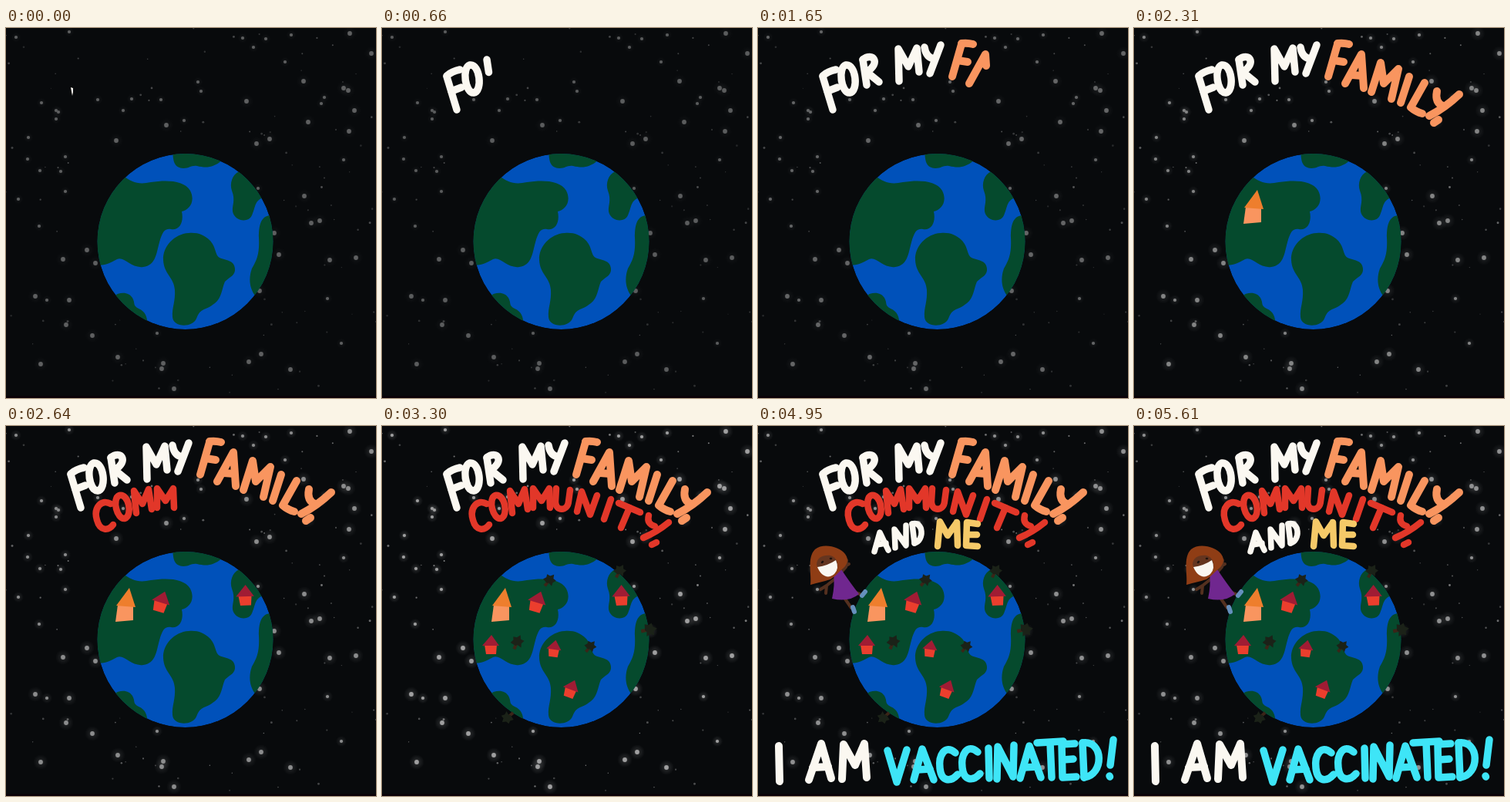
Animation, 480 px wide and 480 px high, one loop 6.27 s. Source, as an HTML page:

```html
<!DOCTYPE html>
<html lang="en">
<head>
<meta charset="utf-8">
<title>For my family, community, and me</title>
<style>
@property --s { syntax: "<number>"; inherits: true; initial-value: 0; }
html, body { margin: 0; width: 100%; height: 100%; overflow: hidden; background: #080a0c; }
svg { display: block; width: 100vw; height: 100vh; animation: tick 6.27s steps(19) infinite; }

/* --s counts the 330 ms steps of the loop */
@keyframes tick { to { --s: 19; } }
@keyframes twinkle {
  0% { opacity: .42; animation-timing-function: steps(4); }
  21.053% { opacity: .38; animation-timing-function: steps(3); }
  36.842% { opacity: .6; animation-timing-function: steps(3); }
  52.632% { opacity: .74; animation-timing-function: steps(3); }
  68.421% { opacity: .64; animation-timing-function: steps(2); }
  78.947%, 100% { opacity: .66; }
}
.twinkle { animation: twinkle 6.27s infinite; }
.pop { opacity: clamp(0, var(--s) - var(--k) + 1, 1); }
.first { opacity: clamp(0, 1 - var(--s), 1); }
.word path {
  fill: none;
  stroke-linecap: round;
  stroke-linejoin: round;
  stroke-dasharray: 1 3;
  stroke-dashoffset: clamp(0px, (var(--end) - var(--s)) * var(--rate) * 1px, 1.1px);
}
</style>
</head>
<body>
<svg viewBox="0 0 480 480" role="img" aria-label="For my family, community, and me, I am vaccinated!">
  <defs>
    <radialGradient id="glow">
      <stop offset="0" stop-color="#fff" stop-opacity=".5"/>
      <stop offset=".4" stop-color="#fff" stop-opacity=".17"/>
      <stop offset="1" stop-color="#fff" stop-opacity="0"/>
    </radialGradient>
    <clipPath id="globe"><circle cx="232.500" cy="277" r="114"/></clipPath>
    <g id="tree">
      <path d="M-2 3H2L2.500 12H-2Z" fill="#3b2518"/>
      <path d="M-8 6L-6 1L-8-3L-3-4L0-9L3-4L8-4L6 1L8 6L2 5L0 7Z" fill="#1b2218"/>
    </g>
  </defs>

  <rect width="480" height="480" fill="#080a0c"/>
  <g id="stars" class="twinkle"><g id="glows" class="twinkle"></g></g>
  <rect y="477.500" width="480" height="2.500" fill="#0a0006"/>

  <g clip-path="url(#globe)">
    <circle cx="232.500" cy="277" r="114" fill="#0051ba"/>
    <g fill="#054a2d">
      <path d="M150 190C164 202 174 203 188 200C207 197 231 197 239 211C246 225 238 236 228 238C231 252 225 263 214 261C206 260 203 264 199 278C195 293 194 308 178 310C162 312 154 296 144 300C136 304 131 308 118 308L100 250Z"/>
      <path d="M237 266C218 267 203 284 204 301C205 320 218 323 219 340C220 355 215 363 216 375C217 389 242 389 247 377C253 362 257 368 271 357C280 350 280 338 284 329C290 323 298 321 297 312C296 301 286 302 277 298C271 295 273 285 265 276C257 268 248 265 237 266Z"/>
      <path d="M216 158C217 172 217 181 230 182C239 182 239 178 248 179C260 182 269 181 280 172V155Z"/>
      <path d="M303 186C293 190 290 202 293 211C298 224 293 230 294 238C296 250 314 254 319 243C324 232 322 225 333 220L325 180Z"/>
      <path d="M343 243C330 244 328 257 328 272C329 292 326 300 319 312C315 323 315 336 323 347L355 320V243Z"/>
      <path d="M139 348C149 341 160 343 164 350C168 357 164 360 172 364C181 368 183 374 184 386L150 390Z"/>
    </g>
  </g>

  <g class="pop" style="--k:7">
    <path d="M145 232L165 233L165 252L142 254Z" fill="#f9955f"/>
    <path d="M160 210L143 233L168 235Z" fill="#ee7e2d"/>
  </g>
  <g id="town"></g>

  <g class="pop" style="--k:13" fill="none" stroke-linecap="round" stroke-linejoin="round">
    <path d="M110 220L121 236M121 214L132 218M99 199L89 207L81 212M106 192L114 183L115 174M89 207L88 217M113 182L118 179" stroke="#54301f" stroke-width="4"/>
    <path d="M123 235L125 241M135 220L139 215" stroke="#6590bd" stroke-width="6"/>
    <path d="M98 192L108 186Q120 204 131 218Q118 229 96 224Q100 206 98 192Z" fill="#70278f"/>
    <path d="M68 206C70 193 63 171 74 160C85 151 106 157 113 166C119 174 115 181 109 186C104 190 99 196 94 199C84 202 79 203 68 206Z" fill="#8f3d15"/>
    <path d="M76 180C76 171 84 167 94 168C103 170 105 181 102 187C96 198 82 196 76 180Z" fill="#65351f"/>
    <path d="M77 183Q91 181 101 174Q106 185 99 192C91 199 82 195 77 183Z" fill="#faf7f1"/>
    <path d="M83 177L84 176M94 172L95 172" stroke="#20130e" stroke-width="2.500"/>
  </g>

  <g id="words"></g>
  <path class="first" d="M84 77L87 78L87 83L86 88Z" fill="#fbf8f1"/>
</svg>

<script>
const $ = id => document.getElementById(id);

function add(parent, tag, attrs) {
  const el = document.createElementNS("http://www.w3.org/2000/svg", tag);
  for (const key in attrs) el.setAttribute(key, attrs[key]);
  return parent.appendChild(el);
}

// Sky: placed bright stars, then a seeded dust of faint ones
const bright = [
  218,468, 204,435, 202,442, 45,436, 145,427, 315,433, 331,423, 369,443, 112,399, 78,385,
  82,353, 38,348, 74,300, 105,288, 116,305, 143,146, 208,126, 312,95, 325,150, 342,144,
  386,69, 392,122, 445,134, 474,33, 446,7, 444,81, 438,78, 452,107, 387,218, 396,253,
  407,250, 420,301, 454,298, 354,294, 348,266, 329,341, 327,208, 438,171, 409,98, 413,90,
  231,120, 307,13, 337,14, 362,44, 321,25, 370,9, 249,70, 253,82, 201,93, 152,107,
  163,92, 119,93, 46,97, 65,107, 68,109, 65,118, 29,142, 28,170, 77,167, 71,186,
  44,185, 77,212, 16,222, 43,257, 82,5, 13,12, 435,409, 417,351, 196,396, 53,353
];
let seed = 11;
const rand = () => (seed = seed * 16807 % 2147483647) / 2147483647;

for (let i = 0; i < bright.length; i += 2) {
  const cx = bright[i], cy = bright[i + 1];
  const r = i < 72 ? 2.9 : 2.1;
  add($("glows"), "circle", { cx, cy, r: r * 3.6, fill: "url(#glow)" });
  add($("stars"), "circle", { cx, cy, r, fill: "#d6d6d6" });
}
for (let i = 0; i < 100; i++) {
  add($("stars"), "circle", {
    cx: rand() * 480, cy: rand() * 476, r: .6 + rand() * .9,
    fill: "#ccc", opacity: .35 + rand() * .5
  });
}

// Town: x, y, angle, scale, step
const houses = [
  [201, 228, 17, 1.1, 8], [310, 220, -2, 1.07, 8], [141, 284, 0, 1, 9],
  [223, 289, 8, .88, 9], [245, 341, 20, .95, 10]
];
const trees = [
  [218, 199, 40, .9, 9], [309, 187, 30, .9, 9], [348, 264, 80, 1, 10],
  [176, 279, 25, .95, 9], [271, 285, 40, .85, 10], [162, 379, 230, .9, 10]
];
const place = ([x, y, angle, size, k]) => ({
  class: "pop", style: `--k:${k}`,
  transform: `translate(${x} ${y}) rotate(${angle}) scale(${size})`
});
for (const h of houses) {
  const g = add($("town"), "g", place(h));
  add(g, "path", { d: "M-8 0H8L7 12L-6 12Z", fill: "#eb3e2d" });
  add(g, "path", { d: "M1-13L-11 1H11Z", fill: "#a01c34" });
}
for (const t of trees) add($("town"), "use", { href: "#tree", ...place(t) });

// Lettering: each word is written stroke by stroke between two steps
function write(label, from, to, color, width, strokes) {
  const g = add($("words"), "g", { class: "word", "aria-label": label, stroke: color, "stroke-width": width });
  const rate = strokes.length / (to - from);
  strokes.forEach((d, i) =>
    add(g, "path", { d, pathLength: 1, style: `--end:${from + (i + 1) / rate};--rate:${rate}` }));
}
const white = "#fbf8f1", cyan = "#3ee5f7";

write("For my", 0, 4, white, 9.5, [
  "M84 63L97 106", "M84 62Q91 56 101 54", "M90 82L103 77",
  "M114 48C103 51 108 85 119 84C131 82 127 46 114 48Z",
  "M136 41L141 74", "M136 41C149 31 160 45 141 57L157 70",
  "M183 69L182 27L195 50L206 26L209 57",
  "M216 25Q218 38 228 40", "M237 22L223 59"
]);
write("family,", 4, 7, "#f9955f", 10, [
  "M264 21L252 63", "M264 20Q272 19 279 21", "M259 42L272 44",
  "M274 72L295 34L298 78", "M283 61L296 62",
  "M308 83L320 45L324 72L343 53L334 92",
  "M357 63L346 97", "M377 71L359 103Q366 109 374 111",
  "M393 82Q390 97 401 101", "M422 86Q403 104 383 114", "M395 119L389 123"
]);
write("community,", 7, 10, "#e23729", 8.5, [
  "M136 101C124 94 113 106 118 122C122 137 133 136 139 128",
  "M147 90C137 94 144 122 154 120C165 116 159 87 147 90Z",
  "M169 113L166 84L177 101L185 82L189 108",
  "M196 106L196 81L207 97L217 81L218 106",
  "M226 81L225 98C225 111 241 111 242 98L244 83",
  "M253 111L259 85L270 115L279 90", "M297 95L288 121",
  "M307 100L335 112", "M321 106L310 132",
  "M346 116Q343 127 354 130", "M372 125Q356 138 339 145", "M356 151L350 154"
]);
write("and", 10, 11.7, white, 7.5, [
  "M151 163L158 138L169 161", "M154 154L166 152",
  "M178 158L177 134L192 155L192 129",
  "M200 127L203 152", "M200 127C215 123 216 149 203 152"
]);
write("me", 11.7, 13, "#f5c968", 8.5, [
  "M233 156L236 124L246 142L258 125L259 155",
  "M285 127L271 125L270 155L285 156", "M271 141L284 141"
]);
write("I am", 13, 13.7, white, 10, [
  "M27 415L28 461", "M66 459L82 412L95 457", "M71 443L91 442",
  "M109 458L111 413L126 440L138 412L141 456"
]);
write("vaccinated!", 13.7, 15, cyan, 9.5, [
  "M168 421L180 462L193 420", "M202 459L213 419L228 459", "M206 446L223 445",
  "M256 424C242 412 234 428 236 444C238 462 250 462 259 452",
  "M285 423C271 411 263 427 265 443C267 461 279 461 288 451",
  "M299 418L300 457", "M310 458L311 416L331 455L332 414",
  "M340 457L352 415L367 456", "M345 443L362 442",
  "M362 411L396 409", "M379 411L381 456",
  "M411 412L394 413L395 456L413 455", "M395 433L409 432",
  "M421 411L423 456", "M421 411C449 407 449 453 423 456",
  "M461 407L457 440", "M456 454L456.5 455"
]);
</script>
</body>
</html>
```
